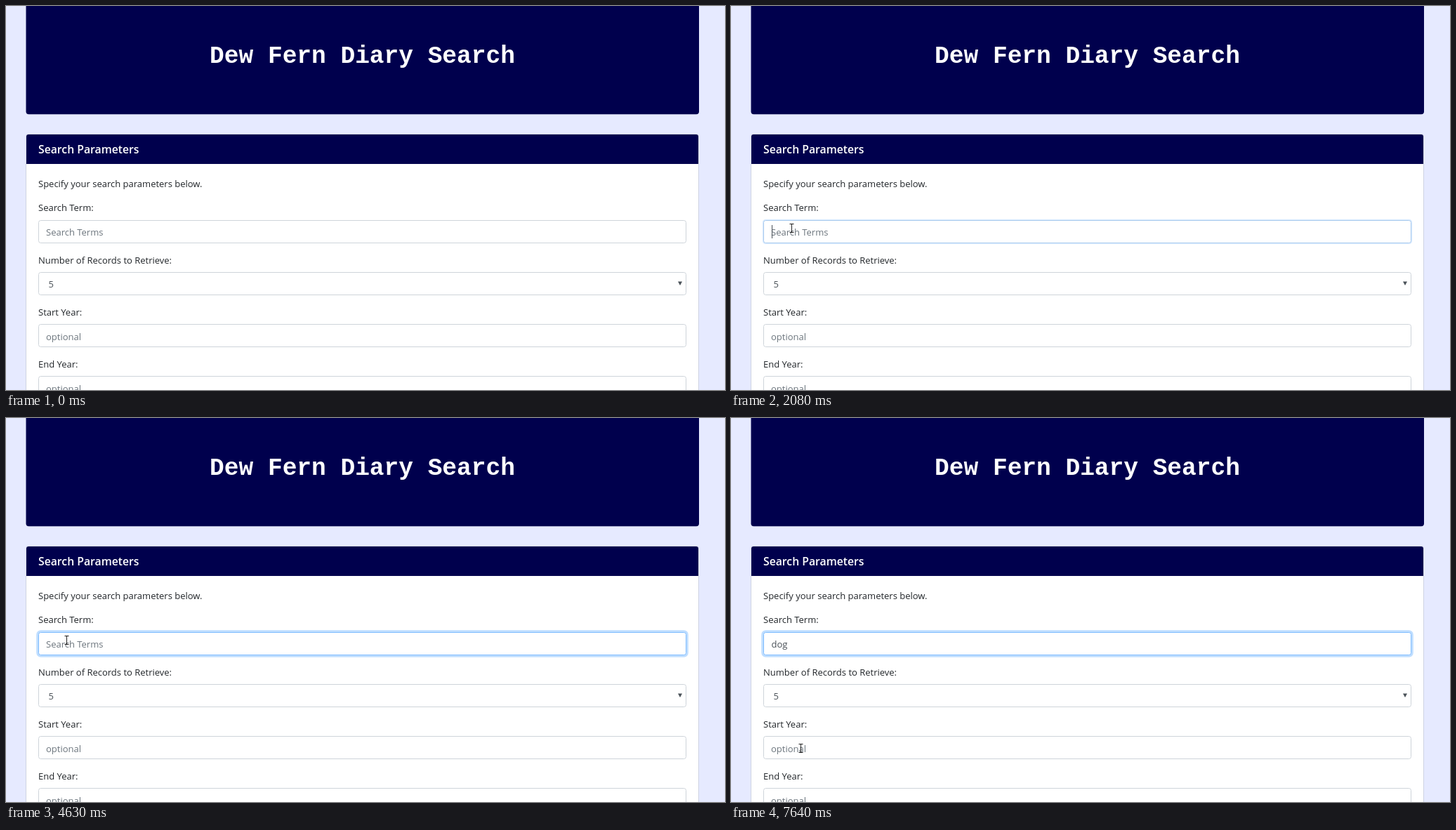
Recreate the animation shown at these times as an HTML page. Size 1024x547 px, loop 8000 ms.

```html
<!DOCTYPE html>
<html lang="en">
<head>
<meta charset="utf-8">
<title>Search form</title>
<style>
  html, body { margin: 0; width: 100%; height: 100%; overflow: hidden; background: #e6eaff; }
  svg { display: block; width: 1024px; height: 547px; font: 13px "Open Sans", "Noto Sans", sans-serif; fill: #212529; }
  .navy { fill: #00004d; }
  .title { font: bold 34.5px "Liberation Mono", monospace; fill: #fff; text-anchor: middle; }
  .heading { font-size: 15.75px; font-weight: 600; fill: #fff; }
  .card { fill: #fff; stroke: #cfd3e2; }
  .field { fill: #fff; stroke: #ced4da; }
  .hint { fill: #6c757d; }
  .value { fill: #495057; }

  .anim { animation: 8s step-end infinite; }
  .border { animation-name: border; }
  .ring { fill: none; stroke: #007bff40; stroke-width: 0; animation-name: ring; }
  .term-hint { animation-name: clear; }
  .key { fill: transparent; }
  .k1 { animation-name: key1; }
  .k2 { animation-name: key2; }
  .k3 { animation-name: key3; }
  .caret { fill: #495057; opacity: 0; animation-name: blink, advance; }
  .pointer { animation-name: travel; }
  .arrow { fill: #fff; stroke: #111; stroke-linejoin: round; opacity: 0; animation-name: arrow; }
  .beam { fill: none; stroke: #222; opacity: 0; animation-name: beam; }

  @keyframes border {
    26% { stroke: #a7c9ed; }
    26.875%, 100% { stroke: #80bdff; }
  }
  @keyframes ring {
    26% { stroke: #007bff22; stroke-width: 3.6px; }
    26.875%, 100% { stroke: #007bff40; stroke-width: 6.5px; }
  }
  @keyframes clear { 70.5%, 100% { opacity: 0; } }
  @keyframes key1 { 70.5%, 100% { fill: #495057; } }
  @keyframes key2 { 71.5%, 100% { fill: #495057; } }
  @keyframes key3 { 74.375%, 100% { fill: #495057; } }
  @keyframes blink {
    0%, 31.75%, 45.25%, 57.875%, 81.25%, 94.5%, 100% { opacity: 0; }
    24.875%, 38.375%, 51.25%, 64.75%, 87.875% { opacity: 1; }
  }
  @keyframes advance {
    0% { transform: none; }
    70.5% { transform: translateX(8px); }
    71.5% { transform: translateX(15px); }
    74.375%, 100% { transform: translateX(24px); }
  }
  @keyframes arrow {
    0%, 12.25%, 92.5%, 100% { opacity: 0; }
    3.5%, 87.875% { opacity: 1; }
  }
  @keyframes beam {
    0%, 87.875% { opacity: 0; }
    12.25%, 92.5%, 100% { opacity: 1; }
  }
  @keyframes travel {
    0%, 3.5% { transform: translate(856px, 512px); }
    4.375% { transform: translate(420px, 352px); }
    5.375% { transform: translate(121px, 375px); }
    10.375% { transform: translate(117px, 368px); }
    11.25% { transform: translate(108px, 351px); }
    12.25% { transform: translate(97px, 332px); }
    13.125% { transform: translate(90px, 321px); }
    14.125% { transform: translate(86px, 316px); }
    87% { transform: translate(83px, 329px); }
    87.875% { transform: translate(73px, 367px); }
    88.75% { transform: translate(68px, 401px); }
    89.75% { transform: translate(69px, 417px); }
    90.625% { transform: translate(73px, 431px); }
    91.5% { transform: translate(80px, 445px); }
    92.5% { transform: translate(88px, 456px); }
    93.5% { transform: translate(94px, 463px); }
    94.5% { transform: translate(98px, 468px); }
    95.5%, 100% { transform: translate(99px, 470px); }
  }
</style>
</head>
<body>
<svg viewBox="0 0 1024 547">
  <rect class="navy" x="28.5" y="-10" width="958.5" height="164.3" rx="4"/>
  <text class="title" x="507.5" y="81">Dew Fern Diary Search</text>

  <rect class="card" x="28.5" y="182.5" width="958" height="400" rx="3.5"/>
  <path class="navy" d="M29 225V186a3 3 0 0 1 3-3H983a3 3 0 0 1 3 3V225Z"/>
  <text class="heading" x="46" y="210">Search Parameters</text>
  <text x="46" y="258">Specify your search parameters below.</text>

  <text x="46" y="292">Search Term:</text>
  <rect class="ring anim" x="46.5" y="305.5" width="922" height="32" rx="3"/>
  <rect class="field border anim" x="46.5" y="305.5" width="922" height="32" rx="3"/>
  <text class="hint term-hint anim" x="57" y="327">Search Terms</text>
  <text x="57.5" y="327"><tspan class="key k1 anim">d</tspan><tspan class="key k2 anim">o</tspan><tspan class="key k3 anim">g</tspan></text>
  <rect class="caret anim" x="58" y="312" width="1" height="19"/>

  <text x="46" y="366.5">Number of Records to Retrieve:</text>
  <rect class="field" x="46.5" y="379.5" width="922" height="32" rx="3"/>
  <text class="value" x="60.5" y="401">5</text>
  <path class="value" d="M957 392.5h6l-3 5.5Z"/>

  <text x="46" y="441">Start Year:</text>
  <rect class="field" x="46.5" y="453.5" width="922" height="32" rx="3"/>
  <text class="hint" x="57" y="475.5">optional</text>

  <text x="46" y="515">End Year:</text>
  <rect class="field" x="46.5" y="527.5" width="922" height="32" rx="3"/>
  <text class="hint" x="57" y="549.5">optional</text>

  <g class="pointer anim">
    <path class="arrow anim" d="M.5 .5V13.4L3.5 10.6L5.6 15.5L7.7 14.6L5.6 9.9H9.6Z"/>
    <path class="beam anim" d="M-2.5 -5.5H3.5M.5 -5.5V6.5M-2.5 6.5H3.5"/>
  </g>
</svg>
</body>
</html>
```
